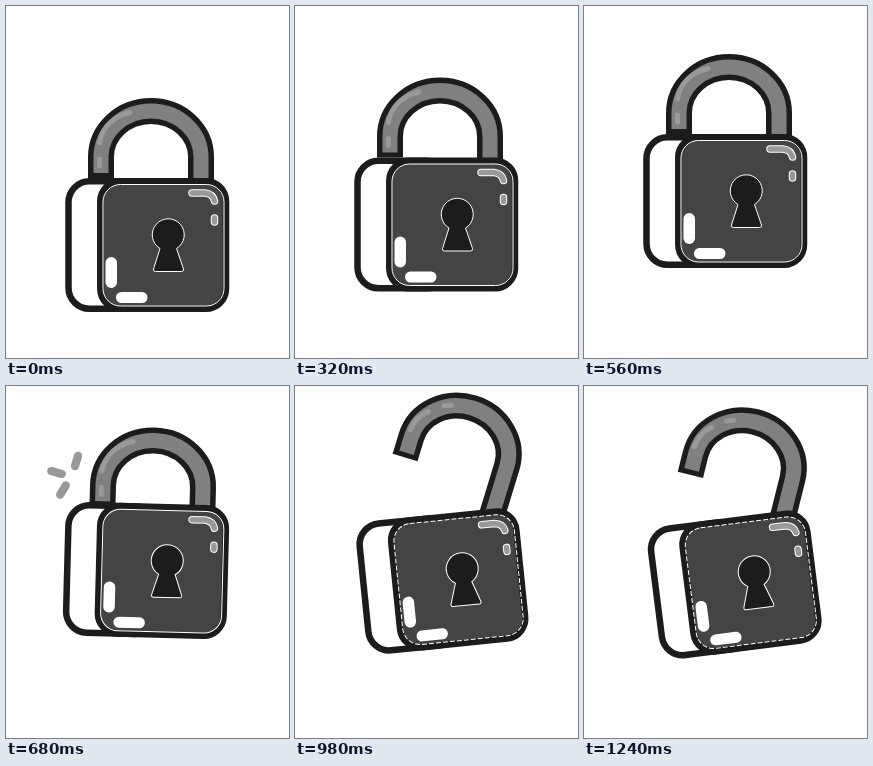
Recreate the animation shown at these times as an HTML page. Size 283 by 352 pixels, loop 1260 ms.

```html
<!DOCTYPE html>
<html lang="en">
<head>
<meta charset="utf-8">
<title>Padlock opening</title>
<style>
  html, body { margin: 0; width: 100%; height: 100%; overflow: hidden; background: #fff; }
  svg { display: block; width: 100vw; height: 100vh; }
  .line { fill: none; stroke: #1c1c1c; }
  .round { fill: none; stroke-linecap: round; stroke-linejoin: round; }
  .thin { stroke: #fff; stroke-width: 1; }
</style>
</head>
<body>
<svg viewBox="0 0 283 352">
  <g id="shackle">
    <path class="line" stroke-width="26" d="M95 172V151A50 46 0 0 1 195 151V240"/>
    <path fill="none" stroke="#808080" stroke-width="15" d="M95 167V151A50 46 0 0 1 195 151V240"/>
    <g class="round" stroke="#999" stroke-width="5">
      <path id="shineClosed" d="M93.500 137C96 121 108 110 124 106.500M93.500 153V160"/>
      <path id="shineOpen" d="M92 144Q93 130 104 121M117 111L124 108.500"/>
    </g>
  </g>
  <g id="body">
    <rect class="line" style="fill:#fff" stroke-width="6.500" x="62.500" y="175.300" width="90" height="127.500" rx="21"/>
    <rect class="line" style="fill:#444" stroke-width="6.500" x="94.300" y="175.300" width="125.700" height="127.500" rx="20"/>
    <rect id="rim" class="thin" fill="none" x="97" y="178.500" width="121" height="121.500" rx="17.500"/>
    <path class="thin" fill="#1c1c1c" d="M154 242.500A16 16 0 1 1 170.500 242.500L177.500 263Q178 265.500 175.500 265.500H149.500Q147 265.500 147.500 263Z"/>
    <rect fill="#fff" x="99.500" y="251" width="11.500" height="31" rx="5.700"/>
    <rect fill="#fff" x="110" y="286" width="31.500" height="11" rx="5.500"/>
    <g class="round">
      <path id="glint" stroke="#fff" stroke-width="7.500" d="M186 187H199Q207 188 208.500 195M208.500 212V216"/>
      <path stroke="#999" stroke-width="5.500" d="M186 187H199Q207 188 208.500 195M208.500 212V216"/>
    </g>
  </g>
  <g id="sparks" class="round" stroke="#999"></g>
</svg>
<script>
const LOOP = 1260, STEP = 20;
const $ = id => document.getElementById(id);

// Rows: time, dx, dy, angle
const rise = [[0, 0, 0, 0], [320, 0, -20.5, 0], [520, 0, -42, 0], [560, 0, -44, 0]];
const bodyKeys = [...rise,
  [680, -1, -54, 1.5], [840, 4, -52, -5.2], [980, 5, -46, -5.8],
  [1080, 8, -44.5, -7], [1160, 8, -41, -7.5], [1240, 8, -43, -7.2]];
const shackleKeys = [...rise,
  [680, 2, -50.5, 1.5], [840, 13.5, -66, 12], [980, 19, -85, 17],
  [1100, 19.5, -84, 17], [1240, 15, -70.5, 14]];

// Rows: start x, y, end x, y, angle
const sparks = [
  [70.5, 75, 78.5, 46, -74],
  [50.5, 86.5, 21, 78.5, 15],
  [57, 104, 40.5, 129, -59]
].map(([x0, y0, x1, y1, angle]) => {
  const el = document.createElementNS('http://www.w3.org/2000/svg', 'path');
  el.setAttribute('d', 'M-7.500 0H7.500');
  el.setAttribute('stroke-width', 11.5);
  $('sparks').append(el);
  return { el, x0, y0, x1, y1, angle };
});

// Smooth curve through the rows, at rest at both ends
function sample(keys, t) {
  const last = keys.length - 1;
  if (t >= keys[last][0]) return keys[last].slice(1);
  const i = keys.findIndex(k => k[0] > t) - 1;
  const a = keys[i], b = keys[i + 1], span = b[0] - a[0], u = (t - a[0]) / span;
  const slope = (n, c) => {
    if (n === 0 || n === last) return 0;
    const p = keys[n - 1], k = keys[n], q = keys[n + 1];
    const s0 = (k[c] - p[c]) / (k[0] - p[0]), s1 = (q[c] - k[c]) / (q[0] - k[0]);
    return s0 * s1 <= 0 ? 0 : 2 * s0 * s1 / (s0 + s1);
  };
  const u2 = u * u, u3 = u2 * u;
  return [1, 2, 3].map(c =>
    (2 * u3 - 3 * u2 + 1) * a[c] + (u3 - 2 * u2 + u) * span * slope(i, c) +
    (3 * u2 - 2 * u3) * b[c] + (u3 - u2) * span * slope(i + 1, c));
}

function place(id, keys, t, px, py) {
  const [x, y, angle] = sample(keys, t);
  $(id).setAttribute('transform', `translate(${x} ${y}) rotate(${angle} ${px} ${py})`);
}

function show(el, on) { el.style.display = on ? '' : 'none'; }

function draw(t) {
  place('body', bodyKeys, t, 162, 229);
  place('shackle', shackleKeys, t, 145, 151);

  const open = t >= 720;
  show($('shineClosed'), !open);
  show($('shineOpen'), open);
  $('rim').setAttribute('stroke-dasharray', open ? '5 2' : 'none');

  show($('sparks'), t >= 620 && t < 880);
  const u = Math.min((t - 680) / 160, 1.03);
  const size = t < 680 ? 0.72 * (t - 600) / 80 : Math.min(0.72 + 0.28 * u, 1);
  for (const s of sparks) {
    const x = s.x0 + (s.x1 - s.x0) * u, y = s.y0 + (s.y1 - s.y0) * u;
    s.el.setAttribute('transform', `translate(${x} ${y}) rotate(${s.angle}) scale(${Math.max(size, 0)})`);
  }
}

const start = performance.now();
function tick() {
  const t = (performance.now() - start) % LOOP;
  draw(Math.floor(t / STEP) * STEP);
  requestAnimationFrame(tick);
}
tick();
</script>
</body>
</html>
```
